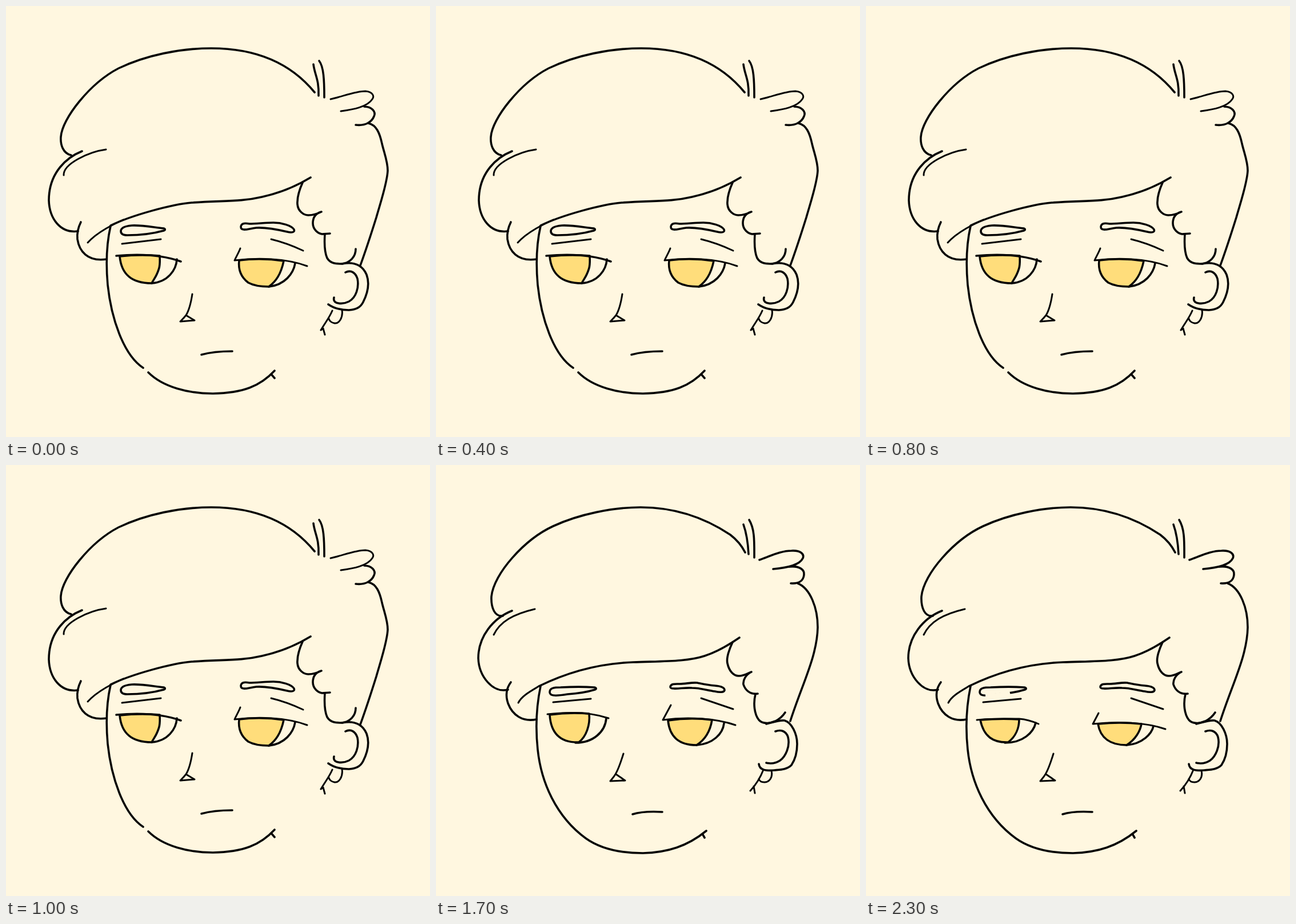
Animation, 742 px wide and 754 px high, one loop 2.4 s. Source, as an HTML page:

```html
<!DOCTYPE html>
<html lang="en">
<head>
<meta charset="utf-8">
<title>Sleepy boy</title>
<style>
  html, body { margin: 0; width: 100%; height: 100%; overflow: hidden; background: #fff7e0; }
  svg { display: block; width: 100%; height: 100%; }
  path { fill: none; stroke: #050505; stroke-width: 3.6; stroke-linecap: round; stroke-linejoin: round; }
  .thin { stroke-width: 3; }
  .iris { fill: #ffdd7b; }
  .rub { stroke: #fff7e0; stroke-width: 7; stroke-linecap: butt; }

  /* Two line drawings swap every 100 ms; the blink fills the last 500 ms. */
  .even, .odd { animation: even .2s step-end infinite; }
  .odd { animation-name: odd; }
  .open, .drowsy, .half, .shut, .rub { animation: open 2.4s step-end infinite; }
  .drowsy { animation-name: drowsy; }
  .half { animation-name: half; }
  .shut { animation-name: shut; }
  .rub { animation-name: rub; }
  @keyframes even { 0% { opacity: 1 } 49.99%, 100% { opacity: 0 } }
  @keyframes odd { 0% { opacity: 0 } 49.99%, 100% { opacity: 1 } }
  @keyframes open { 0% { opacity: 1 } 79.16%, 100% { opacity: 0 } }
  @keyframes drowsy { 0%, 83.33% { opacity: 0 } 79.16%, 95.83%, 100% { opacity: 1 } }
  @keyframes half { 0%, 87.5%, 95.83%, 100% { opacity: 0 } 83.33%, 91.66% { opacity: 1 } }
  @keyframes shut { 0%, 91.66%, 100% { opacity: 0 } 87.5% { opacity: 1 } }
  @keyframes rub { 0% { opacity: 0 } 95.83%, 100% { opacity: 1 } }
</style>
</head>
<body>
<svg viewBox="0 0 742 754" preserveAspectRatio="none">
  <g class="even">
    <!-- hair -->
    <path d="M114 261C100 258 95 243 96 229C98 197 147 135 197 109C245 86 305 74 359 74C440 74 499 101 540 151"/>
    <path d="M133 254C108 264 75 290 75 340C76 372 95 398 126 394"/>
    <path d="M131 378C125 390 124 398 125 408C128 428 142 448 176 443"/>
    <path class="thin" d="M175 251C145 255 100 276 101 296"/>
    <path class="thin" d="M143 414C160 395 190 381 205 374"/>
    <path d="M183 384C220 366 290 347 325 344C380 340 410 343 448 334C480 327 505 317 533 300"/>
    <path d="M538 102C540 120 548 128 547 157M548 96C556 106 557 130 557 160"/>
    <path class="thin" d="M568 163C590 158 612 149 629 149C642 150 645 158 641 163C632 177 607 181 586 184"/>
    <path d="M627 176C640 176 648 185 644 193C640 203 629 210 612 208"/>
    <path d="M634 205C648 208 654 222 658 241C662 258 668 272 668 288C667 310 655 345 648 370C638 402 628 432 620 454"/>
    <path d="M519 309C514 320 509 333 510 347C511 359 521 366 529 366C539 366 546 363 552 360C541 363 537 371 537 380C537 391 546 398 553 399C558 399 562 398 567 398"/>
    <path d="M558 399C557 414 557 430 562 441C568 451 578 451 588 451C603 449 612 438 612 425"/>
    <!-- ear and face -->
    <path d="M588 451C612 446 625 456 631 470C637 486 633 502 625 518C620 528 612 531 600 532C587 532 574 529 564 522"/>
    <path d="M594 466C604 461 612 467 615 477C618 492 613 510 600 517C592 521 584 521 578 519C574 517 573 514 574 510"/>
    <path class="thin" d="M571 533C566 545 558 555 551 567L555 564L558 575M588 532C590 545 583 556 575 555C570 554 566 551 565 547"/>
    <path d="M183 385C175 420 175 455 178 488C184 545 205 610 240 633"/>
    <path d="M249 641C275 667 320 678 362 678C415 677 445 665 470 638M464 644L470 651"/>
    <path class="thin" d="M326 504C324 517 320 533 315 541C311 546 308 549 305 552L330 550L315 541"/>
    <path d="M342 610C360 605 378 604 396 604"/>
    <path d="M201 394C201 388 208 385 220 384C240 383 262 388 276 389C279 390 279 392 276 393C258 398 235 401 212 401C205 401 201 399 201 394Z"/>
    <path d="M411 386C412 379 420 380 426 381C438 381 455 379 468 379C482 379 500 384 504 391C506 396 500 397 492 395C475 391 455 387 438 388C428 389 420 392 416 391C412 391 411 389 411 386Z"/>

    <g class="open">
      <path class="iris" d="M199 438C202 470 220 485 255 485C258 479 261 476 264 469C268 460 270 455 269 437Q234 434 199 438Z"/>
      <path d="M255 485C283 483 298 462 299 443M193 437C225 434 270 434 306 447"/>
      <path class="iris" d="M408 445C406 462 412 475 424 484C435 490 447 491 460 491C472 482 481 470 486 446Q446 440 408 445Z"/>
      <path d="M460 491C488 488 503 468 506 450"/>
      <path class="thin" d="M410 424C407 432 403 438 400 445C440 440 490 441 527 455"/>
      <path class="thin" d="M203 416L271 408M464 408C485 413 505 421 520 428"/>
    </g>
    <g class="half">
      <path class="iris" d="M206 466C215 480 225 486 250 485C258 478 261 472 263 465Q234 463 206 466Z"/>
      <path d="M243 486C265 486 280 478 285 468M198 465C225 463 270 463 290 468"/>
      <path class="iris" d="M410 471C420 485 435 491 455 491C464 486 470 479 473 471Q440 467 410 471Z"/>
      <path d="M455 491C475 490 488 482 493 473"/>
      <path class="thin" d="M395 472C420 466 480 468 507 475"/>
    </g>
  </g>

  <g class="odd">
    <!-- hair -->
    <path d="M117 264C103 266 96 250 97 230C101 190 155 130 205 107C250 86 310 74 358 74C420 74 470 92 515 122C528 132 536 143 541 153"/>
    <path d="M133 255C100 268 74 300 74 338C75 370 100 400 126 393"/>
    <path d="M131 380C122 392 122 405 126 417C134 438 152 450 176 445"/>
    <path class="thin" d="M173 252C135 261 112 274 101 297"/>
    <path class="thin" d="M144 416C150 404 165 396 180 387"/>
    <path d="M180 387C235 360 290 347 345 345C400 343 440 344 470 334C495 326 515 313 531 302"/>
    <path d="M538 104C543 118 546 137 547 156M548 96C558 112 557 135 557 162"/>
    <path d="M566 166C586 159 604 150 622 150C638 149 645 156 642 163C636 176 612 180 590 182"/>
    <path d="M618 178C636 176 645 183 644 192C643 203 634 208 621 207"/>
    <path d="M633 207C655 216 668 250 668 284C667 335 640 385 620 448"/>
    <path d="M519 310C512 325 508 338 510 347C513 361 521 369 530 369C540 369 546 364 552 362C542 367 537 376 538 384C541 393 549 402 563 400"/>
    <path d="M559 401C555 417 557 436 565 446C572 454 585 452 594 448C602 444 607 439 611 433"/>
    <!-- ear and face -->
    <path d="M578 453C590 450 600 446 610 447C622 450 632 470 632 488C632 502 628 516 622 525C614 533 602 533 592 534C580 535 566 535 565 523"/>
    <path d="M594 466C604 462 613 466 616 476C620 492 612 510 602 517C594 522 586 523 578 521"/>
    <path class="thin" d="M573 533C568 546 562 557 550 570M556 562L558 574M587 535C590 548 582 555 575 555C570 555 566 553 565 549"/>
    <path d="M183 387C174 430 175 470 178 498C184 555 210 615 262 653C290 673 328 679 362 679C405 678 440 667 473 640M466 645L470 652"/>
    <path class="thin" d="M328 505C324 518 320 531 314 541C311 546 308 549 305 553L331 552L315 541"/>
    <path d="M344 611C360 606 378 606 396 607"/>
    <path d="M199 397C199 390 207 389 218 389C238 388 262 388 277 389C281 390 281 392 278 393C262 398 245 400 230 401C218 403 206 404 202 402C199 400 199 399 199 397Z"/>
    <path d="M410 388C411 382 419 383 427 383C437 383 447 380 457 381C467 383 475 385 488 386C500 387 505 390 505 394C504 398 496 398 488 396C474 394 462 390 448 390C436 389 424 392 416 391C411 391 410 390 410 388Z"/>
    <path class="rub" d="M209 404Q232 403 252 399"/>

    <g class="open">
      <path class="iris" d="M199 437C201 470 218 486 250 485C263 475 270 455 268 435Q234 432 199 437Z"/>
      <path d="M244 486C275 486 296 467 298 443"/>
      <path class="thin" d="M195 436C230 432 270 432 302 443"/>
      <path class="iris" d="M406 447C409 476 425 490 456 490C472 480 480 465 483 446Q445 441 406 447Z"/>
      <path d="M456 490C485 488 502 470 504 452"/>
      <path class="thin" d="M411 420L397 446C440 440 490 443 524 455"/>
      <path class="thin" d="M205 415L271 409M464 408L520 427"/>
    </g>
    <g class="drowsy">
      <path class="iris" d="M200 446C206 475 222 486 249 485C262 475 268 460 268 445Q234 443 200 446Z"/>
      <path d="M243 486C275 486 293 468 297 451"/>
      <path class="thin" d="M194 446C215 443 250 444 268 444C280 445 293 449 302 453"/>
      <path class="iris" d="M406 453C410 478 428 490 456 490C472 480 480 465 482 453Q445 449 406 453Z"/>
      <path d="M456 490C484 488 500 470 503 457"/>
      <path class="thin" d="M407 434L397 453C440 448 490 450 524 462"/>
      <path class="thin" d="M205 415L271 409M464 408L520 427"/>
    </g>
    <g class="shut">
      <path d="M200 478Q243 492 290 477M402 482Q452 497 503 480"/>
    </g>
  </g>
</svg>
</body>
</html>
```
